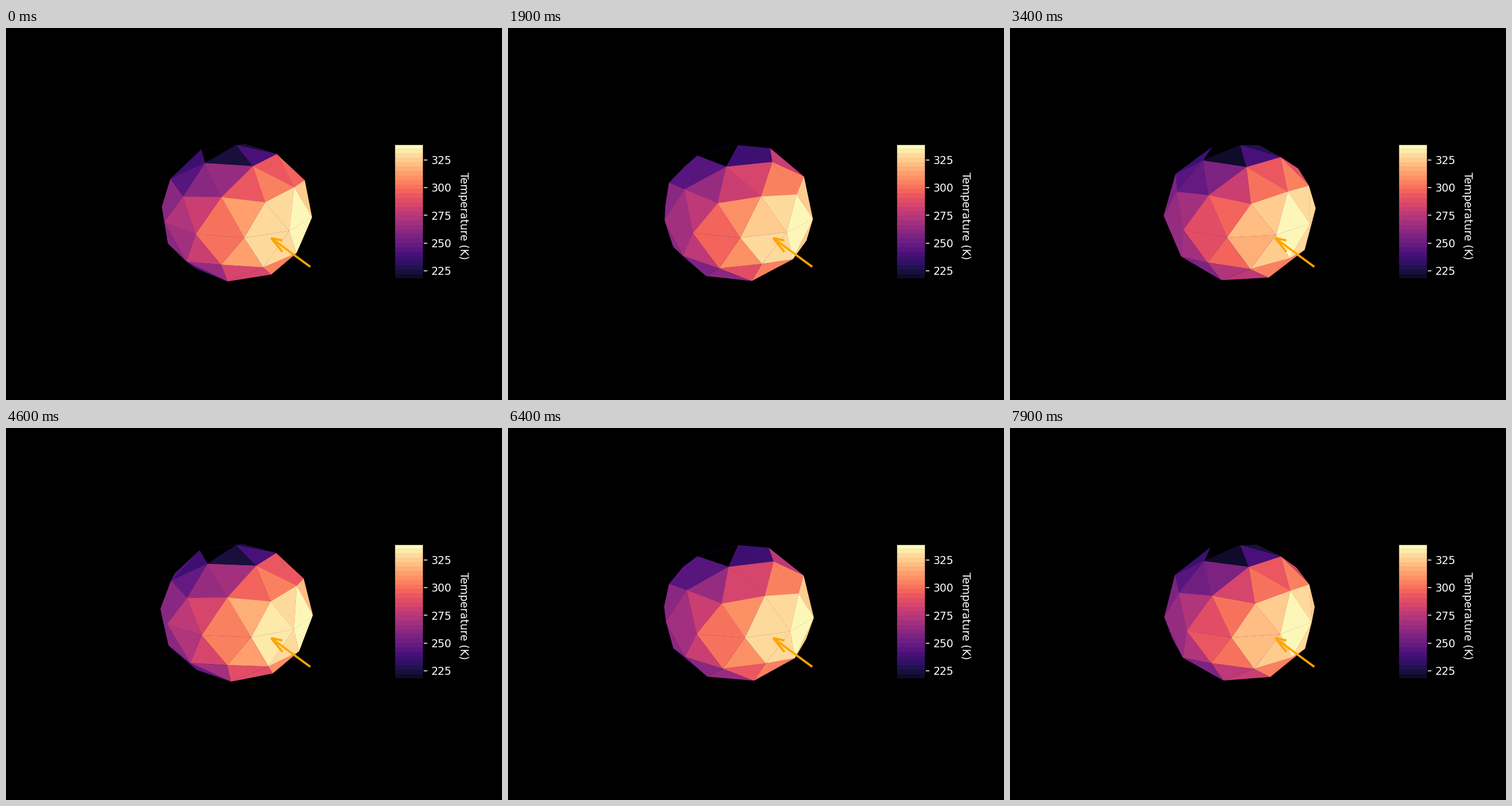
Write a matplotlib script that moves like this. It is 864 px wide and 648 px high and loops after 8 s.

```python
import numpy as np
import matplotlib.pyplot as plt
from matplotlib.animation import FuncAnimation
from matplotlib.cm import ScalarMappable
from matplotlib.collections import PolyCollection
from matplotlib.colors import ListedColormap, Normalize

W, H, DPI = 864, 648, 135
FRAMES, INTERVAL = 80, 100
SPIN_START, SPIN_STEP = 23.7, 1.673      # degrees
CENTER = np.array([400.97, 320.45])
RADIUS, PERSPECTIVE = 133.8, 0.0496
ELEV, FLATTEN = np.radians(18.7), 0.905

# Temperature by |z| of a facet: night minimum, day maximum, lag in degrees
LAT_Z = [0.16, 0.324, 0.608, 0.743, 0.90]
T_MIN = [258, 255, 240, 236, 211]
T_MAX = [338, 331, 307, 292, 241]
LAG = [0, 0, 0, 2, 9]
# Share of the daily swing against longitude seen from the camera
DAY_LON = [-85, -65, -48, -30, -12, 5.7, 25, 42, 52, 66,
           82, 96, 108, 122, 170, 240]
DAY_SHARE = [.02, .06, .16, .35, .53, .74, .92, .99, 1, .98,
             .88, .68, .50, .40, .20, .06]


def ring(z, start):
    a = np.radians(start + 72 * np.arange(5))
    r = np.sqrt(1 - z * z)
    return [np.array([r * np.sin(t), r * np.cos(t), z]) for t in a]


def icosphere():
    """Icosahedron with vertical five-fold axis, each face split in four."""
    top, bottom = np.array([0, 0, 1.0]), np.array([0, 0, -1.0])
    up, low = ring(5 ** -0.5, 0), ring(-5 ** -0.5, 36)
    faces = []
    for i in range(5):
        j = (i + 1) % 5
        faces += [(top, up[i], up[j]), (up[i], up[j], low[i]),
                  (low[i], low[j], up[j]), (bottom, low[i], low[j])]

    def mid(p, q):
        return (p + q) / np.linalg.norm(p + q)

    out = []
    for a, b, c in faces:
        ab, bc, ca = mid(a, b), mid(b, c), mid(c, a)
        out += [(a, ab, ca), (b, bc, ab), (c, ca, bc), (ab, bc, ca)]
    return np.array(out)


def rotate(faces, deg):
    c, s = np.cos(np.radians(deg)), np.sin(np.radians(deg))
    x, y, z = np.moveaxis(faces, -1, 0)
    return np.stack([x * c + y * s, y * c - x * s, z], axis=-1)


def project(faces):
    """Screen points and mean depth of each face."""
    x, y, z = np.moveaxis(faces, -1, 0)
    z = z * FLATTEN
    down = y * np.sin(ELEV) - z * np.cos(ELEV)
    depth = y * np.cos(ELEV) + z * np.sin(ELEV)
    scale = RADIUS / (1 - PERSPECTIVE * depth)
    pts = CENTER + np.stack([x, down], axis=-1) * scale[..., None]
    return pts, depth.mean(axis=1)


def temperature(faces):
    x, y, z = faces.mean(axis=1).T
    z = np.abs(z)
    lon = np.degrees(np.arctan2(x, y)) - np.interp(z, LAT_Z, LAG)
    share = np.interp(lon, DAY_LON, DAY_SHARE, period=360)
    lo, hi = np.interp(z, LAT_Z, T_MIN), np.interp(z, LAT_Z, T_MAX)
    return lo + (hi - lo) * share


levels = plt.get_cmap("magma")((np.arange(32) + 0.5) / 32)
levels[:2] = (0, 0, 0, 1)
cmap = ListedColormap(levels)
norm = Normalize(210, 339)

fig = plt.figure(figsize=(W / DPI, H / DPI), dpi=DPI, facecolor="black")
ax = fig.add_axes([0, 0, 1, 1])
ax.set_xlim(0, W)
ax.set_ylim(H, 0)
ax.axis("off")

body = PolyCollection([], edgecolors="none", linewidths=0, zorder=1)
ax.add_collection(body, autolim=False)

tip = (462, 366)
for end in [(530, 416), (481.5, 370), (481.5, 390)]:
    ax.plot(*zip(tip, end), color="orange", lw=2,
            solid_capstyle="butt", zorder=2)

cax = fig.add_axes([677.2 / W, 1 - 452 / H, 49.9 / W, 249.5 / H])
bar = fig.colorbar(ScalarMappable(norm, cmap), cax=cax,
                   ticks=[225, 250, 275, 300, 325])
bar.outline.set_edgecolor("black")
cax.tick_params(color="white", labelcolor="white", labelsize=10)
fig.text(796.5 / W, 1 - 327.2 / H, "Temperature (K)", color="white",
         fontsize=10, rotation=270, ha="center", va="center")

sphere = icosphere()


def draw(frame):
    faces = rotate(sphere, SPIN_START + SPIN_STEP * frame)
    pts, depth = project(faces)
    order = np.argsort(depth)
    body.set_verts(pts[order])
    body.set_facecolor(cmap(norm(temperature(faces)[order])))
    return [body]


anim = FuncAnimation(fig, draw, frames=FRAMES, interval=INTERVAL,
                     repeat=True, repeat_delay=0)
plt.show()
```
